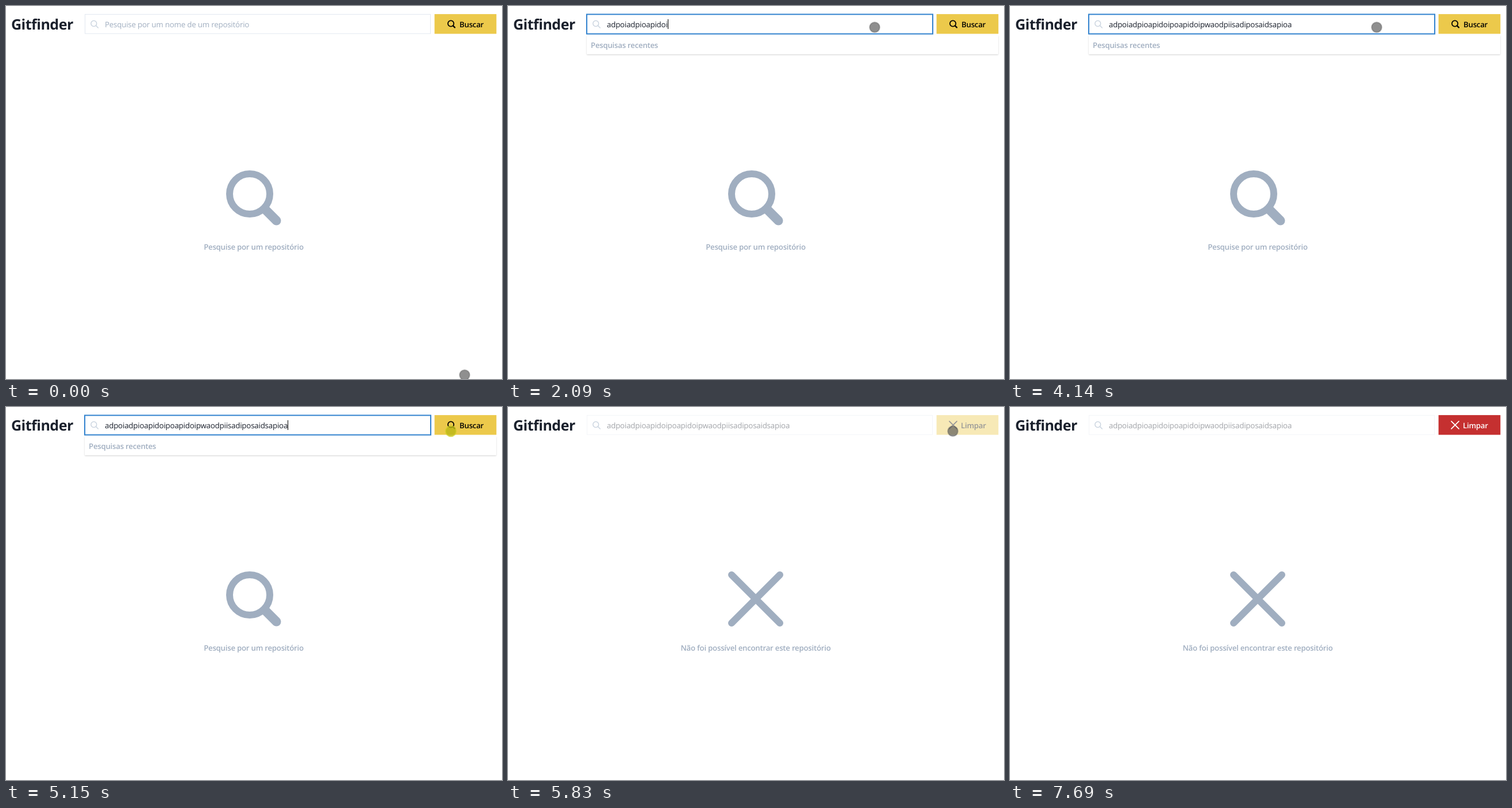
Recreate the animation shown at these times as an HTML page. Size 863 by 649 pixels, loop 8550 ms.

```html
<!DOCTYPE html>
<html lang="pt">
<head>
<meta charset="utf-8">
<title>Gitfinder</title>
<style>
  html, body { margin: 0; height: 100%; overflow: hidden; background: #fff; }
  svg { display: block; }
  text { font: 13.3px "Open Sans", "Noto Sans", sans-serif; letter-spacing: -.19px;
         text-rendering: geometricPrecision; fill: #1a202c; white-space: pre; }
  .bold { font-weight: 600; font-size: 13.2px; letter-spacing: -.22px; }
  .muted { fill: #a0aec0; }
  .mid { text-anchor: middle; }
  #title { font-weight: 700; font-size: 25px; letter-spacing: -.5px; }
  .line { fill: none; stroke-linecap: round; }
</style>
</head>
<body>
<svg width="863" height="649" viewBox="0 0 863 649">
  <defs>
    <g id="lens" class="line">
      <circle cx="41" cy="41" r="35" stroke-width="12"/>
      <path d="M68 68 87.500 87.500" stroke-width="16"/>
    </g>
    <path id="cross" class="line" d="M6 6 90 90M90 6 6 90"/>
    <filter id="shadow" x="-5%" y="-20%" width="110%" height="150%">
      <feDropShadow dx="0" dy="1" stdDeviation="1" flood-opacity=".18"/>
    </filter>
  </defs>

  <text id="title" x="9" y="41">Gitfinder</text>

  <g id="field">
    <rect id="border" fill="#fff"/>
    <text id="hint" class="muted" x="172" y="36.500">Pesquise por um nome de um repositório</text>
    <text id="typed" x="172" y="36.500"></text>
    <rect id="caret" y="23" width="1" height="17"/>
  </g>
  <g class="line" stroke="#cbd5e0" stroke-width="1.5">
    <circle cx="152.800" cy="30.500" r="4.900"/><path d="M156.500 34.200 160.300 38"/>
  </g>

  <g id="recent">
    <rect x="137" y="51" width="716" height="33" rx="1" fill="#fff" filter="url(#shadow)"/>
    <text class="bold muted" x="144" y="72.500">Pesquisas recentes</text>
  </g>

  <g id="button">
    <rect id="buttonBg" x="745.600" y="14.100" width="107.700" height="34.300"/>
    <g id="search">
      <use href="#lens" transform="translate(768 24.500) scale(.147)" stroke="#000"/>
      <text class="bold" x="789" y="36.500" style="fill:#000">Buscar</text>
    </g>
    <path id="spinner" class="line" d="M-4.300 -4.300A6.100 6.100 0 0 1 4.300 4.300" stroke="#000" stroke-width="1.700"/>
    <g id="clear">
      <use href="#cross" transform="translate(767 24) scale(.155)" stroke-width="11"/>
      <text class="bold" x="788" y="36.500" style="fill:inherit" stroke="none">Limpar</text>
    </g>
  </g>

  <g id="start">
    <use href="#lens" x="383" y="286" stroke="#a0aec0"/>
    <text class="bold muted mid" x="431" y="424">Pesquise por um repositório</text>
  </g>
  <path id="skeleton"/>
  <g id="missing">
    <use href="#cross" x="383" y="286" stroke="#a0aec0" stroke-width="12"/>
    <text class="bold muted mid" x="431" y="424">Não foi possível encontrar este repositório</text>
  </g>

  <circle id="pointer" stroke-width="2"/>
</svg>
<script>
const LOOP = 8550, FOCUS = 870, TYPE = 1350, TYPED = 3610, CLICK = 5150, SUBMIT = 5360, RESULT = 5830;
const QUERY = 'adpoiadpioapidoipoapidoipwaodpiisadiposaidsapioa';
const $ = id => document.getElementById(id);
const set = (id, attrs) => { for (const k in attrs) $(id).setAttribute(k, attrs[k]); };
const show = (id, on) => set(id, { visibility: on ? 'visible' : 'hidden' });
const ramp = (t, from, to) => Math.min(1, Math.max(0, (t - from) / (to - from)));
const ease = x => x * x * (3 - 2 * x);
const mix = (a, b, p) => `rgb(${a.map((v, i) => Math.round(v + (b[i] - v) * p))})`;

// Pointer strokes along cubic curves, seen in a few discrete steps
const MOVES = [
  { from: 0, to: 550, steps: 8, x: [798, 700, 566, 638], y: [642, 400, 60, 37] },
  { from: 4340, to: 4820, steps: 7, x: [638, 640, 770, 774], y: [37, 37, 42, 42] },
  { from: 6890, to: 7690, steps: 12, x: [774, 774, 826, 823], y: [42, 60, 660, 670] }
];
const bezier = ([a, b, c, d], p, q = 1 - p) =>
  a * q ** 3 + 3 * b * q * q * p + 3 * c * q * p * p + d * p ** 3;

function pointerAt(t) {
  const { from, to, steps, x, y } = MOVES.findLast(m => t >= m.from);
  const p = Math.floor(ramp(t, from, to) * steps + .05) / steps;
  return { cx: bezier(x, p), cy: bezier(y, p) };
}

// A heading bar, then three columns split ever higher up
function skeletonPath() {
  const card = (x, y, w, h) => `M${x + 1} ${y}h${w - 2}l1 1v${h - 2}l-1 1h${2 - w}l-1 -1v${2 - h}z`;
  let d = card(9, 64, 381, 47);
  for (let i = 0; i < 3; i++) {
    const x = 9 + 286 * i, top = 326 - 108.5 * i;
    d += card(x, 125, 272, top) + card(x, 137 + top, 272, 435 - top);
  }
  return d;
}
set('skeleton', { d: skeletonPath() });

function draw(t) {
  const focused = t >= FOCUS && t < SUBMIT, loading = t >= SUBMIT && t < RESULT;
  const disabled = ease(ramp(t, SUBMIT, SUBMIT + 220));
  const done = ease(ramp(t, RESULT, 6100));

  const length = t < TYPE ? 0 : Math.floor(1 + (QUERY.length - 1) * ramp(t, TYPE, TYPED));
  const blinkOn = t < TYPED || (t - TYPED) % 1060 < 530;
  $('typed').textContent = QUERY.slice(0, length);
  show('hint', !length);
  show('caret', focused && blinkOn);
  set('caret', { x: 172 + (length ? Math.round($('typed').getComputedTextLength()) : 0) });
  set('border', focused
    ? { x: 137, y: 14.5, width: 602, height: 34, stroke: '#3182ce', 'stroke-width': 2 }
    : { x: 137.5, y: 14.5, width: 601, height: 33.5, stroke: '#e2e8f0', 'stroke-width': 1 });
  set('field', { opacity: 1 - .6 * disabled });
  show('recent', focused);
  set('recent', { opacity: ramp(t, FOCUS - 60, 1070) });

  set('button', { opacity: 1 - .6 * (disabled - done) });
  set('buttonBg', { fill: mix([236, 201, 75], [197, 48, 48], done) });
  const ink = mix([0, 0, 0], [255, 255, 255], done);
  set('clear', { fill: ink, stroke: ink });
  show('search', t < SUBMIT);
  show('spinner', loading);
  show('clear', t >= RESULT);
  set('spinner', { transform: `translate(798.500 31.500) rotate(${(t - 5479) * .8})` });

  show('start', t < SUBMIT);
  show('skeleton', loading);
  set('skeleton', { fill: mix([237, 242, 247], [225, 230, 238], ramp(t, SUBMIT, 5760)) });
  show('missing', t >= RESULT);

  const pressed = t >= 740 && t < 940 || t >= CLICK && t < SUBMIT;
  set('pointer', { ...pointerAt(t), r: pressed ? 9.3 : 8.8,
    fill: pressed ? 'rgba(184,182,20,.78)' : 'rgba(80,80,80,.64)',
    stroke: pressed ? 'rgba(215,212,40,.6)' : 'rgba(80,80,80,.35)' });
}

function tick(now) {
  draw(now % LOOP);
  requestAnimationFrame(tick);
}
draw(0);
requestAnimationFrame(tick);
</script>
</body>
</html>
```
